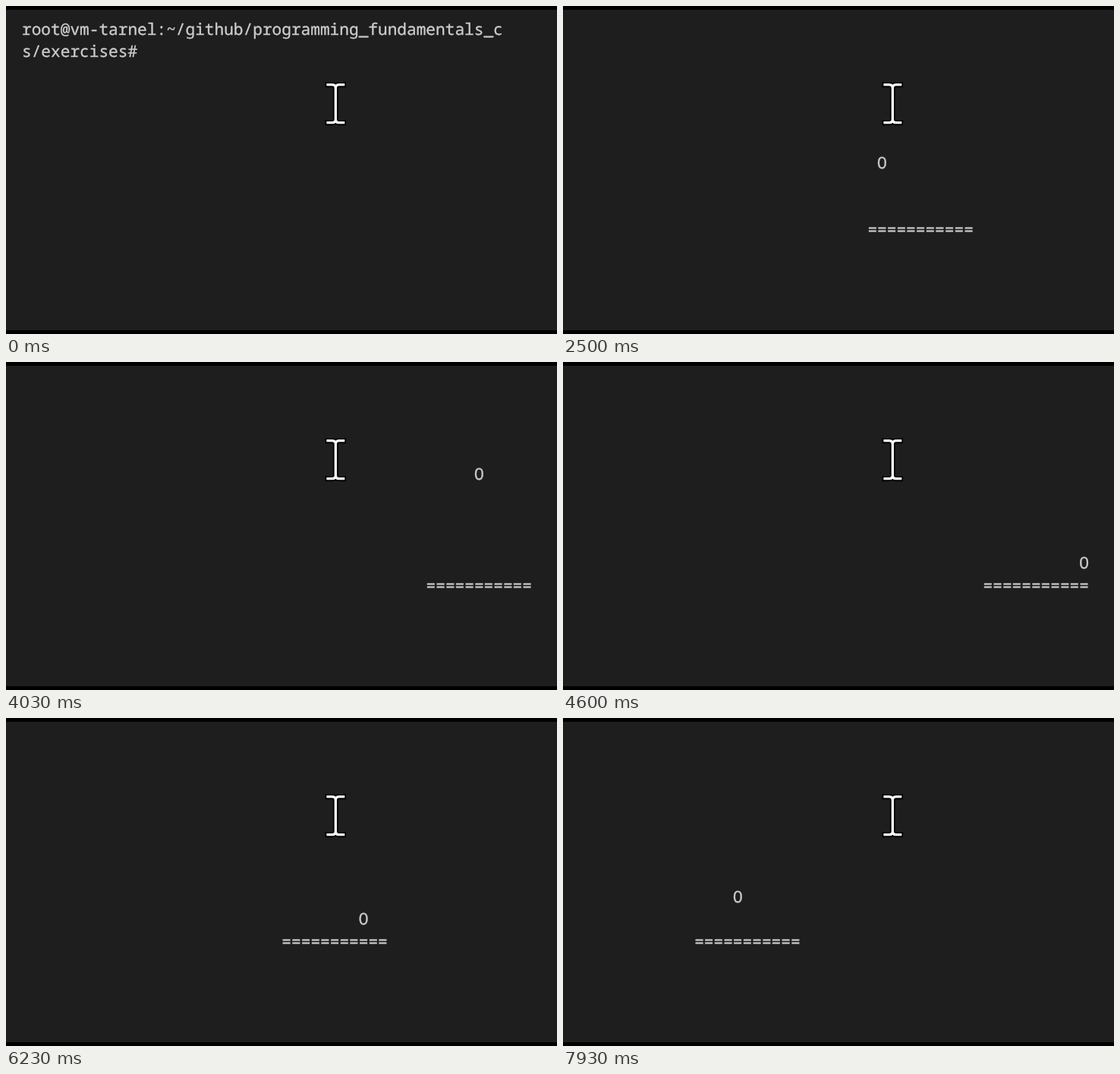
These frames come from a looping animation (726x432 px, 8 s). An HTML page:

```html
<!DOCTYPE html>
<html lang="en">
<head>
<meta charset="utf-8">
<title>Terminal paddle game</title>
<style>
  html, body { margin: 0; width: 100%; height: 100%; overflow: hidden; background: #000; }
  svg { display: block; width: 100vw; height: 100vh; }
  text {
    font: 21.13px "Noto Sans Mono", "DejaVu Sans Mono", monospace;
    fill: #ccc;
    stroke: #ccc;
    stroke-width: 0.35px;
    white-space: pre;
    text-rendering: geometricPrecision;
  }
</style>
</head>
<body>
<svg viewBox="0 0 726 432">
  <defs>
    <path id="beam" fill="none" stroke-linecap="square"
      d="M424 103.7H430Q434.3 104 434.3 108V149.500Q434.3 153.500 430 153.700H424
         M444.600 103.7H438.600Q434.3 104 434.3 108V149.500Q434.3 153.500 438.600 153.700H444.600"/>
  </defs>
  <rect y="5" width="726" height="422" fill="#1e1e1e"/>
  <g id="prompt">
    <text id="line1">root@vm-tarnel:~/github/programming_fundamentals_c</text>
    <text id="line2"></text>
  </g>
  <g id="game">
    <text id="paddle"></text>
    <text id="ball">O</text>
  </g>
  <use href="#beam" stroke="#000" stroke-width="7"/>
  <use href="#beam" stroke="#fff" stroke-width="3.3"/>
</svg>
<script>
const LOOP = 8000, TYPED = 260, START = 1760;
const CELL = 12.68, LINE = 29.3, LEFT = 21, BASE = 37.8;
const COLS = 53, FLOOR = 9, PADDLE = 11;
const BALL_COL = 26, PADDLE_COL = 21, PRESS = 3;

// Pace of the ball and of the key presses, as [time, count] points.
const ballPace = [
  [1990, 0.6], [2030, 1], [3460, 15], [4030, 21], [4960, 32], [5230, 35],
  [6030, 44], [6230, 45], [7130, 56], [7330, 57], [7930, 64]
];
const keyPace = [
  [2000, 0], [2460, 3], [3460, 5], [3760, 7], [5165, 7],
  [5400, 5], [5965, 3], [7060, 0], [8000, -2.5]
];

const $ = id => document.getElementById(id);

// Whole count reached at time t, running evenly between the points.
function countAt(points, t) {
  const next = points.findIndex(p => p[0] > t);
  let value;
  if (next === 0) value = points[0][1];
  else if (next < 0) value = points[points.length - 1][1];
  else {
    const [t0, a] = points[next - 1], [t1, b] = points[next];
    value = a + (b - a) * (t - t0) / (t1 - t0);
  }
  return Math.floor(value + 1e-6);
}

function place(el, col, row) {
  el.setAttribute("x", LEFT + col * CELL);
  el.setAttribute("y", BASE + row * LINE);
}

function show(el, on) {
  el.setAttribute("visibility", on ? "visible" : "hidden");
}

function draw(t) {
  show($("prompt"), t < START);
  show($("game"), t >= START);
  $("line2").textContent = "s/exercises#" + (t >= TYPED ? " dotnet run" : "");

  // The ball folds back at the right wall, the top and the floor.
  const n = countAt(ballPace, t);
  const col = Math.min(COLS - 1, COLS - Math.abs(COLS - BALL_COL - n));
  const row = FLOOR - Math.abs(FLOOR - (n + 1) % (2 * FLOOR));
  place($("ball"), col, row);

  const pad = PADDLE_COL + PRESS * countAt(keyPace, t);
  const cells = Array(PADDLE).fill("=");
  if (row === FLOOR && col >= pad && col < pad + PADDLE) cells[col - pad] = "\u00a0";
  $("paddle").textContent = cells.join("");
  place($("paddle"), pad, FLOOR);
}

place($("line1"), 0, 0);
place($("line2"), 0, 1);

const begin = performance.now();
function tick() {
  draw((performance.now() - begin) % LOOP);
  requestAnimationFrame(tick);
}
tick();
</script>
</body>
</html>
```
